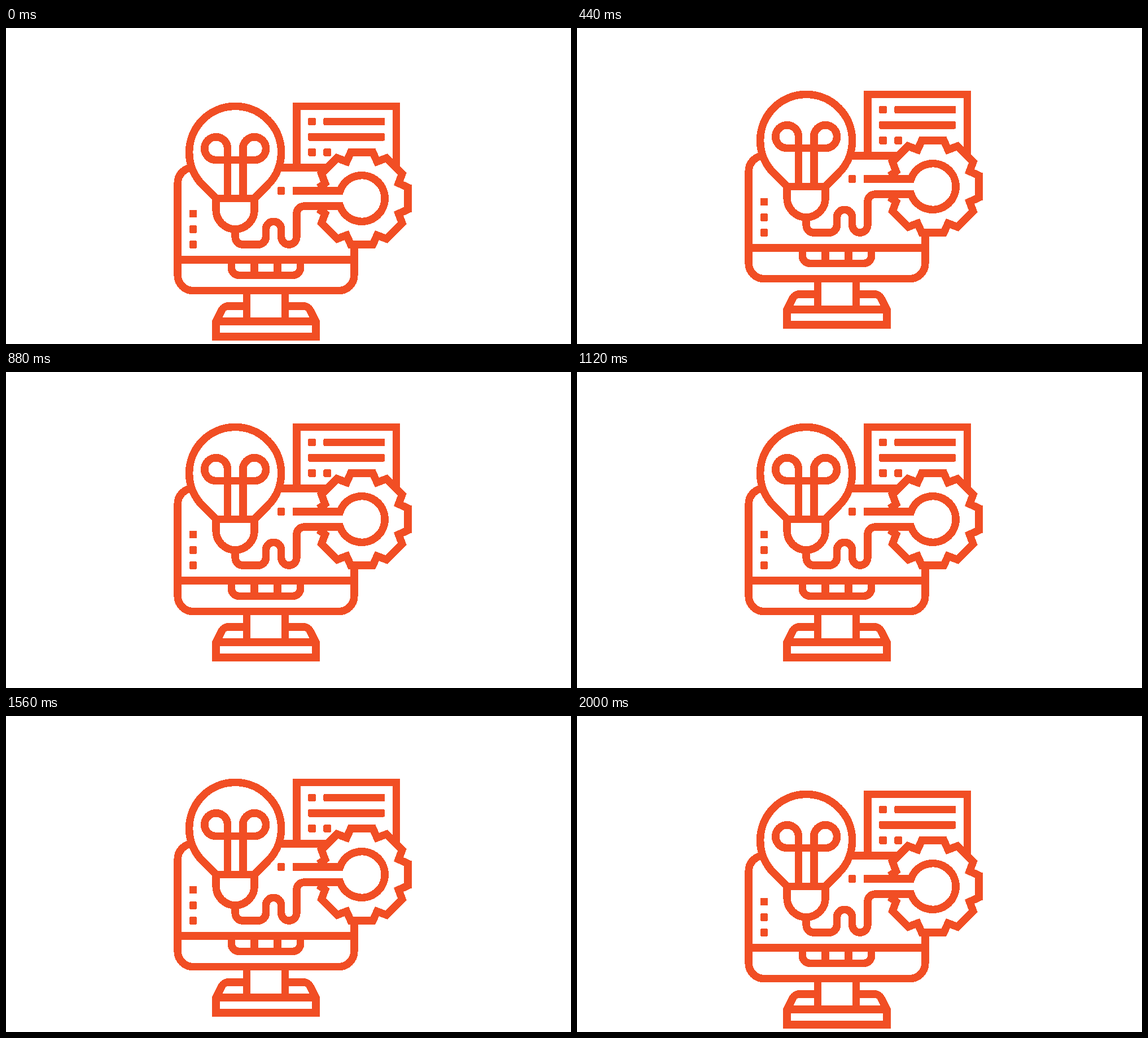
Write an HTML page that moves like this. It is 1001 by 559 pixels and loops after 2040 ms.

```html
<!DOCTYPE html>
<html lang="en">
<head>
<meta charset="utf-8">
<title>Floating idea icon</title>
<style>
  html, body { margin: 0; width: 100%; height: 100%; overflow: hidden; background: #fff; }
  svg { display: block; width: 1001px; height: 559px; }
  .line { fill: none; stroke: #f14e24; stroke-width: 16; }
  .solid { fill: #fff; }
  .dots { fill: #f14e24; }
</style>
</head>
<body>
<svg viewBox="0 0 1001 559" shape-rendering="crispEdges">
  <g id="icon">
    <g transform="translate(297.4 131.6) scale(.8495)">
      <!-- document -->
      <path class="line" d="M256 136V8H464V140"/>
      <!-- monitor -->
      <path class="line" d="M376 296V360a32 32 0 0 1-32 32H40a32 32 0 0 1-32-32V168a32 32 0 0 1 32-32H330
        M8 328H376M120 328V344a16 16 0 0 0 16 16H248a16 16 0 0 0 16-16V328M168 328V360M216 328V360"/>
      <!-- stand -->
      <path class="line" d="M152 392V456M232 392V456M88 456H296
        M152 424H114a16 16 0 0 0-14.3 8.8L88 456V488H296V456L284.3 432.8a16 16 0 0 0-14.3-8.8H232"/>
      <g class="dots" id="dots"></g>
      <path class="line solid" id="gear"/>
      <!-- key ring and wire -->
      <path class="line" d="M248 184H346.7A48 48 0 1 1 346.7 216H272a16 16 0 0 0-16 16V280a16 16 0 0 1-32 0
        V264a16 16 0 0 0-32 0V280a16 16 0 0 1-16 16H144a16 16 0 0 1-16-16V264"/>
      <!-- bulb -->
      <path class="line solid" d="M88 200V224a40 40 0 0 0 80 0V200"/>
      <path class="line solid" d="M88 200L60.1 171.9A96 96 0 1 1 195.9 171.9L168 200Z"/>
      <path class="line" d="M112 200V96a24 24 0 1 0-24 24H168a24 24 0 1 0-24-24V200"/>
    </g>
  </g>
</svg>
<script>
  const icon = document.getElementById('icon');

  // x, y, width of each bar; all are 16 high
  const bars = [
    [280, 32, 16], [312, 32, 128], [280, 64, 160], [280, 96, 16], [312, 96, 16],
    [216, 176, 16], [32, 224, 16], [32, 256, 16], [32, 288, 16]
  ];
  document.getElementById('dots').innerHTML = bars.map(([x, y, w]) =>
    `<rect x="${x}" y="${y}" width="${w}" height="16" rx="3"/>`).join('');

  // Seven teeth clockwise; the left one gives way to the key lines
  const polar = (r, deg) => {
    const a = deg * Math.PI / 180;
    return [392 + r * Math.cos(a), 200 + r * Math.sin(a)].map(n => n.toFixed(2)).join(' ');
  };
  const outline = ['302 178', polar(83, 202.5)];
  for (let tooth = 1; tooth <= 7; tooth++) {
    const mid = 180 + 45 * tooth;
    outline.push(polar(98.7, mid - 13.5), polar(98.7, mid + 13.5), polar(83, mid + 22.5));
  }
  outline.push('302 222');
  document.getElementById('gear').setAttribute('d', 'M' + outline.join('L'));

  // Rise 47px in 25 steps, sink back, rest for one step
  const STEP = 40, HALF = 25, RISE = 47;
  function draw() {
    const step = Math.floor(performance.now() / STEP) % (2 * HALF + 1);
    const lift = Math.round(RISE * Math.min(step, 2 * HALF - step) / HALF);
    icon.setAttribute('transform', `translate(0 ${-lift})`);
    requestAnimationFrame(draw);
  }
  draw();
</script>
</body>
</html>
```
